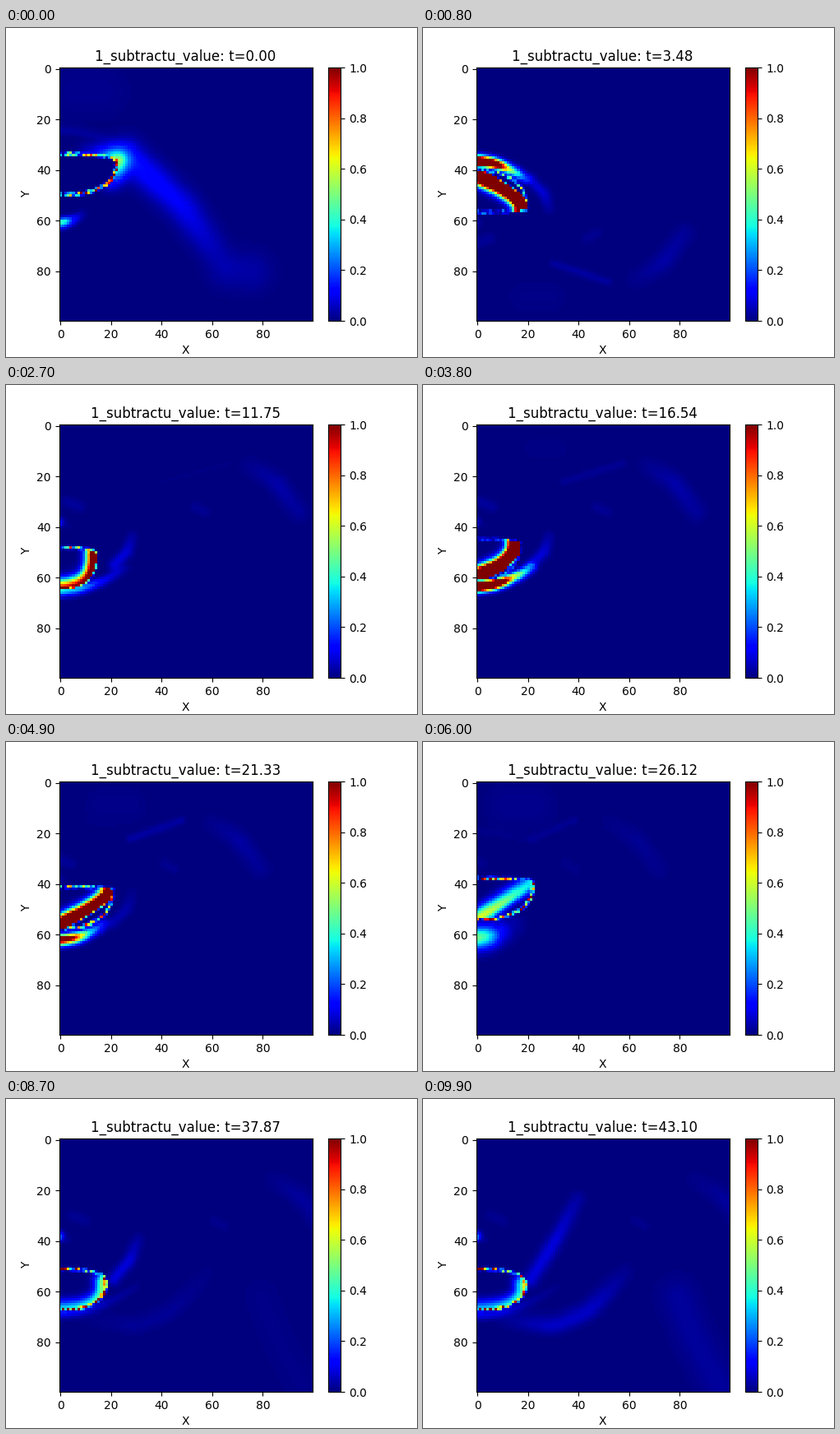
A matplotlib script that plays this animation: 500 px wide and 400 px high, repeating every 10 s.

```python
import numpy as np
import matplotlib.pyplot as plt
from matplotlib.animation import FuncAnimation

FRAMES, DT = 100, 0.43532
HALF = 5.9               # frames per half shedding cycle
SIZE, SAMPLES = 100, 32

grid = np.arange(SIZE, dtype=float)
X, Y = np.meshgrid(grid, grid)
grain = np.random.default_rng(4).uniform(.1, 1.5, (SIZE, SIZE))


def bump(t, center, width):
    return np.exp(-((t - center) / width) ** 2)


def ramp(t, start, end):
    s = np.clip((t - start) / (end - start), 0, 1)
    return s * s * (3 - 2 * s)


def path(*points):
    """Resample a few (x, y) points evenly and round the corners."""
    p = np.array(points, float)
    s = np.r_[0, np.cumsum(np.hypot(*np.diff(p, axis=0).T))]
    u = np.linspace(0, s[-1], SAMPLES)
    x, y = (np.interp(u, s, c) for c in p.T)
    for c in (x, y):
        for _ in range(6):
            c[1:-1] = (c[:-2] + 2 * c[1:-1] + c[2:]) / 4
    return x, y


def glow(line, strengths, left, right=None):
    """Soft light along a line, with its own width on each side."""
    strengths = np.atleast_1d(strengths)
    if strengths.max() < .002:
        return np.zeros((SIZE, SIZE))
    x, y = line
    u = np.linspace(0, 1, len(x))
    amp = np.interp(u, np.linspace(0, 1, len(strengths)), strengths)
    dx, dy = grid - x[:, None], grid - y[:, None]
    k = (dx[:, None, :] ** 2 + dy[:, :, None] ** 2).argmin(axis=0)
    tx, ty = np.gradient(x), np.gradient(y)
    n = np.hypot(tx, ty) + 1e-9
    tx, ty = (tx / n)[k], (ty / n)[k]
    ox, oy = X - x[k], Y - y[k]
    across = tx * oy - ty * ox
    along = (tx * ox + ty * oy) * ((k == 0) | (k == len(x) - 1))
    width = np.where(across < 0, left, left if right is None else right)
    return amp[k] * np.exp(-(across ** 2 + along ** 2) / width ** 2)


class Body:
    """Rounded pocket on the left edge that slides down each half cycle."""
    POWER = 2.4

    def __init__(self, t):
        self.top = 33.5 + 17.5 * min(t / 4.1, 1)
        self.bottom = self.top + 16.2
        self.length = 22 - 8 * bump(t, 3.4, 1.3)
        self.tip = self.top + 16.2 * (.08 + .039 * (t - 1.8) ** 2)

    def outline(self, start=-1.0, end=1.0):
        """Run from the top (-1) around the tip (0) to the bottom (1)."""
        a = np.linspace(start, end, 48) * np.pi / 2
        s = np.sign(a) * np.abs(np.sin(a)) ** (2 / self.POWER)
        x = self.length * np.abs(np.cos(a)) ** (2 / self.POWER)
        reach = np.where(s < 0, self.tip - self.top, self.bottom - self.tip)
        return x, self.tip + s * reach

    def inside(self):
        reach = np.where(Y < self.tip, self.tip - self.top,
                         self.bottom - self.tip)
        s = np.abs(Y - self.tip) / reach
        edge = np.clip(1 - s ** self.POWER, 0, 1) ** (1 / self.POWER)
        return (s < 1) & (X < self.length * edge + .3)


def lobe(t):
    """Patch below the pocket that flares up and is swept out."""
    y = 60.5 + .4 * max(t, 0) ** 2
    reach = max(9 + 5 * t, 3)
    s = np.linspace(0, 1, SAMPLES)
    line = -1 + reach * s, y - .35 * reach * s ** 2
    amp = .5 * bump(t, .8, 3) + 2.2 * bump(t, 2.4, .6)
    spread = 2.5 * bump(t, 1, .5)
    return glow(line, amp * np.array([1, .8, .3, .08]),
                1.6 + spread, 2.1 + spread)


def band(t):
    """Streak off the tip that stretches out into the wake."""
    grow, late = ramp(t, 4.3, 4.65), np.clip((t - 4.6) / 1.3, 0, 1)
    fade = ramp(t, 1.4, 2.2) * bump(max(t, HALF), HALF, .5)
    line = path((21 + 5 * late, 55 + 10 * late),
                (26 + 5 * grow + 17 * late, 50 - 11 * grow + 6 * late),
                (28 + 12 * grow + 24 * late, 44 - 22 * grow))
    light = np.array([.08 + .06 * late, .08 + .03 * late, .03])
    patch = glow(path((66, 20), (75, 19)), .035 * bump(t, HALF, .6), 8)
    return np.hypot(glow(line, fade * light, 2.2 + .8 * grow + 3 * late),
                    patch)


def wake(t):
    """Faint shapes that drift to the right."""
    life = np.sin(np.pi * np.clip(t / HALF, 0, 1))
    x = 43 + 9.3 * t
    surge = bump(t, 4.7, .27)
    parts = [
        glow(path((x, 16), (x + 10, 22), (x + 19, 34)),
             life * np.array([.015, .04, .025]), 3.8),
        glow(path((13 + 8 * t, 22), (21 + 10 * t, 18), (26 + 12 * t, 15)),
             .04 * life * bump(t, 1.5, 1.3), 1.6),
        glow(path((27 + 7.6 * t, 32), (31 + 7.6 * t, 34)), .02 * life, 2),
        glow(path((2.2 * t - 5, 30), (2.2 * t, 32)), .025 * life, 2.2),
        glow(path((6 + 6 * t, 9), (16 + 6 * t, 9)),
             .016 * bump(t, .5, 2) * (t >= 0) * (t < HALF), 10 - 1.6 * min(t, 3)),
        glow(path((10, 71), (30, 74), (44, 68), (58, 53)),
             surge * np.array([.015, .07, .07, .02]), 4, 3.2),
        glow(path((79, 62), (85, 78), (95, 97)), .03 * surge, 7.5),
    ]
    return np.sqrt(sum(p ** 2 for p in parts))


def halo(t):
    """Light hugging the nose of the pocket as a half cycle begins."""
    line = Body(max(t, 0)).outline(-.7, .3)
    return glow(line, .5 * bump(t, 0, .45) * np.array([.15, .6, 1, .3]),
                4.2, .6)


def pocket(t):
    body = Body(t)
    bulge = np.clip((t - 1) / 2.5, 0, 1)
    x, y = (c[::-1] for c in body.outline(0, 1))
    chord = body.bottom + (body.tip - body.bottom) * x / body.length
    amp = .6 * np.sin(np.pi * t / HALF) + 3 * bump(t, 2.4, .75)
    tilt = np.array([1.6 - .8 * bulge, 1, .8 + .6 * bulge])
    fill = glow((x, chord + (y - chord) * bulge), amp * tilt,
                3.6, .5 + 2 * bump(t, 1, .5))
    rim = glow(body.outline(), np.array([1, .5, 1, 1, 1]), .55) * grain
    rim = rim * (1 - .8 * bump(t, 2.5, .7))
    return np.hypot(fill * body.inside(), rim), body.inside()


def field_at(frame):
    turn, t = divmod(frame, HALF)
    field = np.zeros((SIZE, SIZE))
    for n in (-1, 0, 1):
        age = t + n * HALF
        layer = wake(age) + lobe(age) + band(age) + halo(age)
        field += layer[::-1] if n else layer
    inner, mask = pocket(t)
    field = np.hypot(np.where(mask, 0, field), inner)
    return field[::-1] if turn % 2 else field


fig, ax = plt.subplots(figsize=(5, 4), dpi=100)
image = ax.imshow(field_at(0), cmap="jet", vmin=0, vmax=1)
fig.colorbar(image, ax=ax)
ax.set_xlabel("X")
ax.set_ylabel("Y")
title = ax.set_title("")


def update(frame):
    image.set_data(field_at(frame))
    title.set_text(f"1_subtractu_value: t={frame * DT:.2f}")
    return image, title


anim = FuncAnimation(fig, update, frames=FRAMES, interval=100,
                     repeat=True, repeat_delay=0)
plt.show()
```
